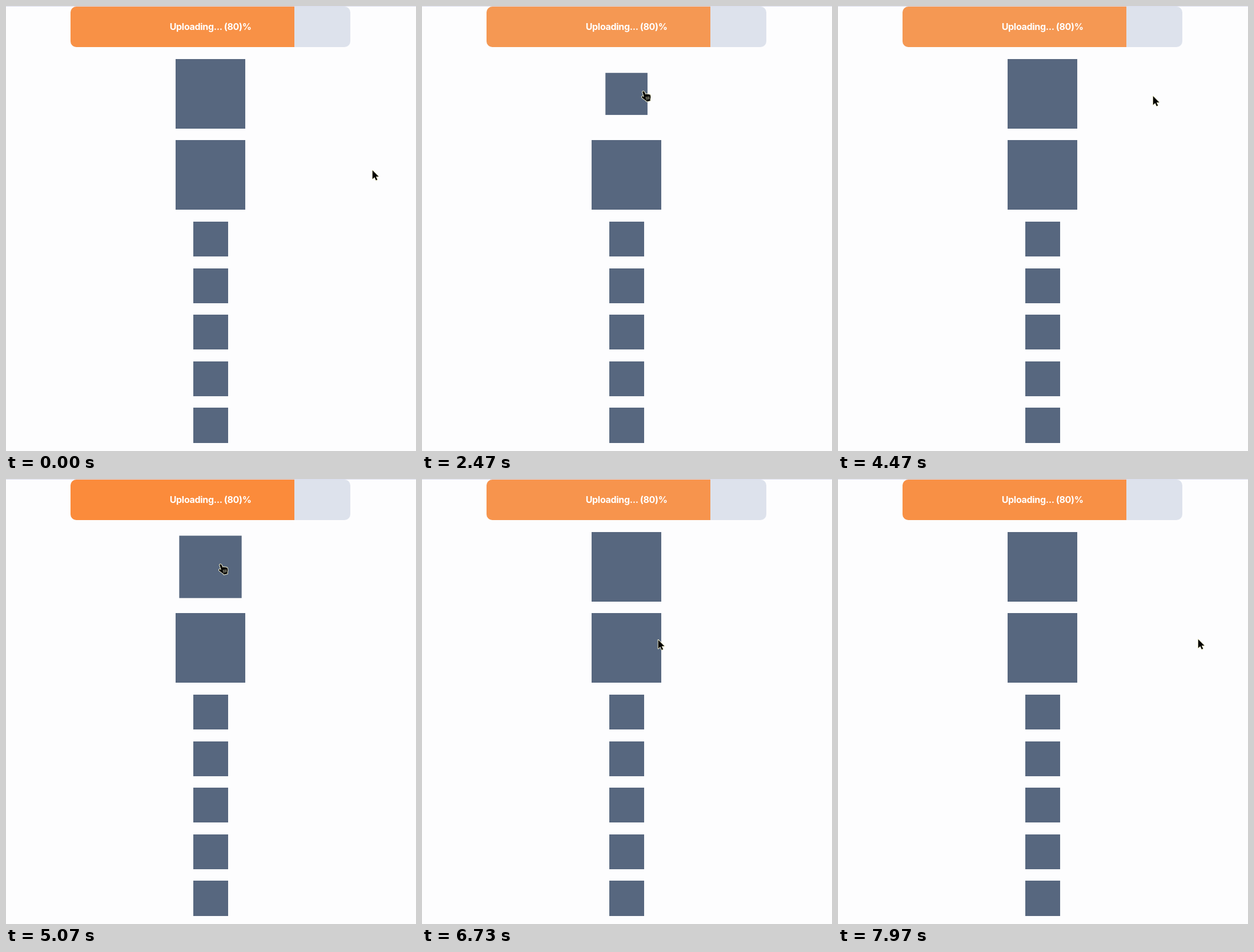
Write an HTML page that moves like this. It is 718 px wide and 780 px high and loops after 8000 ms.

```html
<!DOCTYPE html>
<html lang="en">
<head>
<meta charset="utf-8">
<title>Upload progress</title>
<style>
  :root { --u: 1.02px; --loop: 8s; }
  html, body { margin: 0; width: 100%; height: 100%; overflow: hidden; }
  body { position: relative; background: #fdfdfe; }

  .rule { position: absolute; left: 0; top: 0; width: 100%; height: 1px; background: #dadcee; }

  .column {
    position: absolute; left: 113.4px; top: .8px; width: calc(480 * var(--u));
    display: flex; flex-direction: column; align-items: center; gap: calc(20 * var(--u));
  }

  .bar {
    position: relative; width: 100%; height: calc(70 * var(--u));
    border-radius: calc(10 * var(--u)); overflow: hidden; background: #dde2ec;
  }
  .fill {
    position: absolute; left: 0; top: 0; width: 80%; height: 100%;
    animation: pulse 2s cubic-bezier(.4, 0, .6, 1) -.57s infinite;
  }
  .label {
    position: absolute; inset: 0; display: flex; align-items: center; justify-content: center;
    color: #fff; font: 700 16px/1 Inter, "Open Sans", sans-serif; letter-spacing: -.02em;
    white-space: nowrap;
  }

  .box { width: calc(60 * var(--u)); height: calc(60 * var(--u)); flex: none; background: #57677f; }
  .big { width: calc(120 * var(--u)); height: calc(120 * var(--u)); }
  .first { animation: squeeze-twice var(--loop) ease-in-out infinite; }
  .second { animation: squeeze-once var(--loop) ease-in-out infinite; }

  .cursor {
    position: absolute; left: 0; top: 0; width: 40px; height: 40px; overflow: visible;
    animation: travel var(--loop) ease-in-out infinite;
  }
  .cursor path { stroke-linejoin: round; stroke-linecap: round; }
  .shape { fill: #000; stroke: #f6f4d6; stroke-width: 2px; paint-order: stroke; }
  .knuckles { fill: none; stroke: #e6e4c4; stroke-width: .9px; }
  .hand { animation: hand var(--loop) step-end infinite; }
  .arrow { animation: arrow var(--loop) step-end infinite; }

  @keyframes pulse {
    0%, 100% { background-color: #fd8632; }
    50% { background-color: #f59853; }
  }
  @keyframes squeeze-twice {
    0%, 28.75%, 35%, 58.125%, 64.375%, 100% { transform: scale(1); }
    31.875%, 61.25% { transform: scale(.5); }
  }
  @keyframes squeeze-once {
    0%, 84.625%, 90.875%, 100% { transform: scale(1); }
    87.75% { transform: scale(.5); }
  }
  @keyframes travel {
    0% { transform: translate(641px, 287px); }
    10.5% { transform: translate(520px, 50px); }
    12.875%, 18.75% { transform: translate(521px, 48px); }
    21.25% { transform: translate(517px, 50px); animation-timing-function: ease-in; }
    28.75% { transform: translate(419px, 139px); animation-timing-function: ease-out; }
    30.875% { transform: translate(387px, 150px); animation-timing-function: ease-out; }
    41%, 43.75% { transform: translate(363px, 153px); }
    52.125% { transform: translate(514px, 154px); animation-timing-function: ease-out; }
    54.125%, 55.875% { transform: translate(551px, 157px); animation-timing-function: ease-in; }
    58.125% { transform: translate(419px, 152px); animation-timing-function: ease-out; }
    63.375%, 69.125% { transform: translate(375px, 150px); }
    77.5% { transform: translate(557px, 286px); }
    79.625% { transform: translate(551px, 286px); animation-timing-function: linear; }
    84.125% { transform: translate(413px, 281px); animation-timing-function: ease-out; }
    88.5%, 93.875% { transform: translate(380px, 283px); }
    99.625%, 100% { transform: translate(630px, 280px); }
  }
  @keyframes hand {
    0%, 47.25%, 71.5%, 95.125%, 100% { opacity: 0; }
    28.75%, 58.125%, 84.625% { opacity: 1; }
  }
  @keyframes arrow {
    0%, 47.25%, 71.5%, 95.125%, 100% { opacity: 1; }
    28.75%, 58.125%, 84.625% { opacity: 0; }
  }
</style>
</head>
<body>
  <div class="rule"></div>
  <div class="column">
    <div class="bar">
      <div class="fill"></div>
      <div class="label">Uploading... (80)%</div>
    </div>
    <div class="box big first"></div>
    <div class="box big second"></div>
    <div class="box"></div>
    <div class="box"></div>
    <div class="box"></div>
    <div class="box"></div>
    <div class="box"></div>
  </div>
  <svg class="cursor" aria-hidden="true">
    <g class="arrow">
      <path class="shape" d="M.8 1V16.2L4.4 12.9 6.9 18.6 9.3 17.5 6.8 12H11.6Z"/>
    </g>
    <g class="hand">
      <path class="shape" d="M-1 .5C0-1 2-.6 2.6 1L4.6 5.2C5.3 4 7 3.9 7.6 5 8.4 4.1 10 4.3 10.5 5.4 11.4 4.8 12.6 5.2 12.9 6.6 13.6 9 13.2 11.5 12.6 13.5L12.8 16 6.5 17.6 5.6 15.8C3.5 14.5 0 12.5-2 10-2.6 8.6-1 7.8.3 8.6L2 9.4Z"/>
      <path class="knuckles" d="M5.4 9.4L6.2 14M7.9 9L8.6 13.6M10.3 8.8L10.8 13"/>
    </g>
  </svg>
</body>
</html>
```
